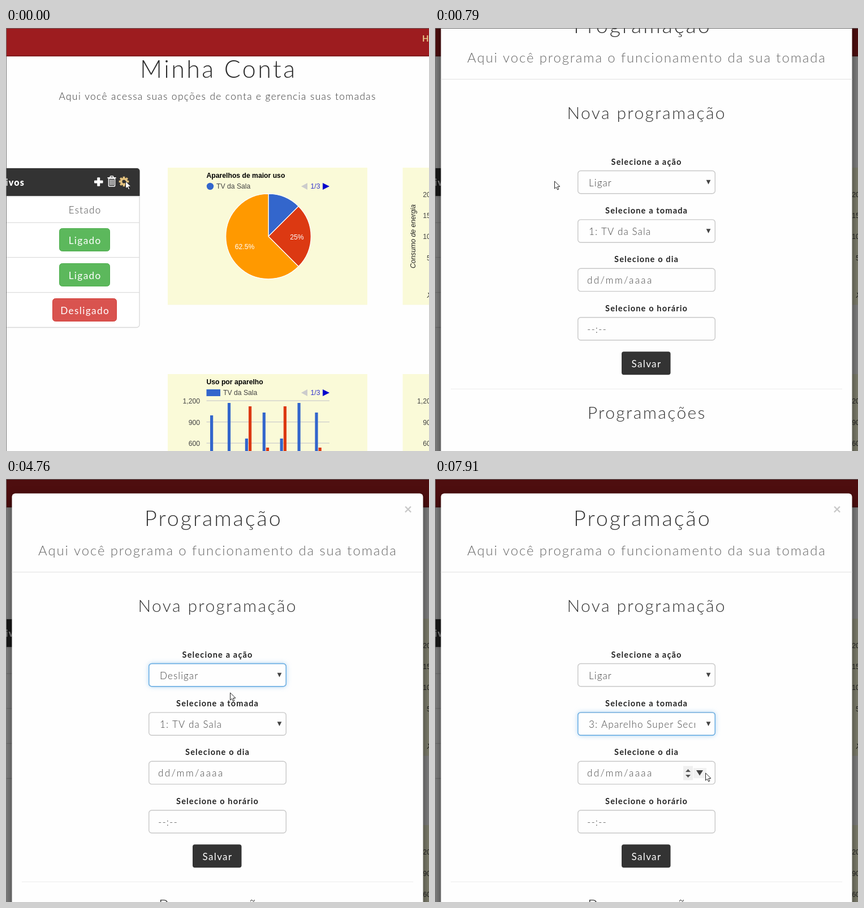
Animation, 748 px wide and 748 px high, one loop 8 s. Source, as an HTML page with a canvas:

```html
<!DOCTYPE html>
<html lang="pt-BR">
<head>
<meta charset="utf-8">
<title>Minha Conta</title>
<style>
  html, body { margin: 0; width: 100%; height: 100%; overflow: hidden; background: #fff; }
  canvas { display: block; }
</style>
</head>
<body>
<canvas id="stage" width="748" height="748"></canvas>
<script>
const ctx = document.getElementById('stage').getContext('2d');
const LOOP = 8000, SIZE = 748, ITEM = 23;
const BLUE = '#3366cc', RED = '#dc3912', ORANGE = '#ff9900', CREAM = '#fafad8';

// Cursor moves: start, end, number of visible steps, destination x, y
const moves = [
  [2160, 2290, 2, 216, 268],
  [2730, 3390, 6, 420, 342],
  [3830, 4430, 5, 402, 406],
  [4580, 4760, 2, 396, 378],
  [4880, 5160, 3, 408, 340],
  [5300, 5580, 3, 404, 372],
  [5880, 6420, 5, 403, 429],
  [6700, 6850, 2, 402, 484],
  [6970, 7250, 3, 410, 506],
  [7520, 7910, 4, 478, 520],
];
const actions = ['Ligar', 'Desligar'];
const outlets = ['1: TV da Sala', '2: Abajur', '3: Aparelho Super Secreto'];

// Value of the last [time, value] pair already reached
const at = (t, ...pairs) => pairs.filter(p => p[0] <= t).pop()[1];

function cursorAt(t) {
  let x = 211, y = 271;
  for (const [start, end, steps, toX, toY] of moves) {
    if (t < start) break;
    const shown = Math.min(steps - 1, Math.floor((t - start) / (end - start) * (steps - 1) + 1e-6)) + 1;
    const p = shown / steps, k = p * p * (3 - 2 * p);
    x += (toX - x) * k;
    y += (toY - y) * k;
  }
  return { x, y };
}

function rect(x, y, w, h, fill, stroke, r = 0) {
  ctx.beginPath();
  ctx.roundRect(x, y, w, h, r);
  if (fill) { ctx.fillStyle = fill; ctx.fill(); }
  if (stroke) { ctx.strokeStyle = stroke; ctx.stroke(); }
}

function poly(points, fill, stroke) {
  ctx.beginPath();
  points.forEach(([x, y]) => ctx.lineTo(x, y));
  ctx.closePath();
  if (fill) { ctx.fillStyle = fill; ctx.fill(); }
  if (stroke) { ctx.strokeStyle = stroke; ctx.stroke(); }
}

function text(str, x, y, size, color, { weight = 300, align = 'center', spacing = .08 } = {}) {
  const gap = size * spacing;
  ctx.font = `${weight} ${size}px Lato, sans-serif`;
  ctx.letterSpacing = gap + 'px';
  ctx.textAlign = align;
  ctx.fillStyle = color;
  ctx.fillText(str, x + (align === 'center' ? gap / 2 : align === 'right' ? gap : 0), y);
}

function label(str, x, y, color = '#444', align = 'left', style = '') {
  ctx.font = `${style} 12.2px "Liberation Sans", Arial, sans-serif`;
  ctx.letterSpacing = '0px';
  ctx.textAlign = align;
  ctx.fillStyle = color;
  ctx.fillText(str, x, y);
}

function gear(x, y, color) {
  ctx.save();
  ctx.translate(x, y);
  ctx.strokeStyle = color;
  ctx.lineWidth = 3.6;
  ctx.beginPath();
  ctx.arc(0, 0, 4.9, 0, 7);
  ctx.stroke();
  for (let i = 0; i < 8; i++) {
    ctx.rotate(Math.PI / 4);
    rect(-1.8, -8.8, 3.6, 3.4, color);
  }
  ctx.restore();
}

function trash(x, y) {
  rect(x, y + 2, 15, 2, '#fff');
  ctx.lineWidth = 1.6;
  rect(x + 4.8, y, 5.4, 3, null, '#fff', 1);
  rect(x + 2, y + 4, 11, 14, null, '#fff', 1);
  for (let i = 0; i < 3; i++) rect(x + 4.2 + i * 2.6, y + 6, 1.4, 10, '#fff');
  ctx.lineWidth = 1;
}

function deviceCard(gearColor) {
  ctx.lineWidth = 1.3;
  rect(-20, 248, 256, 281.5, '#fff', '#d8d8d8', 5);
  rect(-20, 248, 256.5, 49, '#333', null, [0, 5, 0, 0]);
  [298, 344, 405.5, 467.5].forEach(y => rect(0, y - .6, 236, 1.3, '#ddd'));
  text('ivos', 32, 279, 16, '#fff', { weight: 900, align: 'right' });
  rect(156, 269.5, 15.5, 5, '#fff', null, 1);
  rect(161.2, 264.3, 5, 15.5, '#fff', null, 1);
  trash(179.5, 262);
  gear(208.5, 271.5, gearColor);
  text('Estado', 139, 328, 17, '#444');
  const button = (str, x, y, w, fill, border) => {
    rect(x + .5, y + .5, w - 1, 40, fill, border, 5);
    text(str, x + w / 2, y + 28, 17.2, '#fff', { weight: 400 });
  };
  button('Ligado', 94, 354, 90, '#5cb85c', '#4cae4c');
  button('Ligado', 94, 416, 90, '#5cb85c', '#4cae4c');
  button('Desligado', 82, 478, 114, '#d9534f', '#d43f3a');
}

function chartHead(title, y) {
  label(title, 354.5, y + 17.5, '#000', 'left', 'bold');
  poly([[522, y + 33], [533, y + 27], [533, y + 39]], '#ccc');
  poly([[572, y + 33], [560, y + 27], [560, y + 39]], '#0000cc');
  label('1/3', 547, y + 37, '#3333cc', 'center');
}

function pieChart() {
  chartHead('Aparelhos de maior uso', 247);
  ctx.fillStyle = BLUE;
  ctx.beginPath();
  ctx.arc(361, 280, 6.2, 0, 7);
  ctx.fill();
  label('TV da Sala', 372, 284);
  let angle = -Math.PI / 2;
  [[.125, BLUE], [.25, RED], [.625, ORANGE]].forEach(([share, color]) => {
    const end = angle + share * 2 * Math.PI;
    ctx.beginPath();
    ctx.moveTo(464, 368.5);
    ctx.arc(464, 368.5, 75.3, angle, end);
    ctx.closePath();
    ctx.fillStyle = color;
    ctx.fill();
    ctx.strokeStyle = '#fff';
    ctx.lineWidth = 1.2;
    ctx.stroke();
    angle = end;
  });
  label('25%', 514.5, 373.5, '#fff', 'center');
  label('62.5%', 422, 390.5, '#fff', 'center');
}

function barChart() {
  chartHead('Uso por aparelho', 612);
  rect(354.5, 639, 24.5, 12, BLUE);
  label('TV da Sala', 384, 649);
  ['1,200', '900', '600'].forEach((value, i) => {
    const y = 659 + i * 37.5;
    rect(354.5, y - .5, 217.5, 1.3, '#ccc');
    label(value, 343, y + 5, '#444', 'right');
    label(value, 757.5, y + 5, '#444', 'right');
  });
  const blue = [685, 663, 726, 680, 726, 663, 680], red = [0, 0, 669, 742, 669, 0, 742];
  blue.forEach((top, i) => {
    const x = 361 + i * 30.9;
    rect(x, top, 5.2, SIZE - top, BLUE);
    if (red[i]) rect(x + 6.2, red[i], 5.2, SIZE - red[i], RED);
  });
}

function page(t) {
  rect(0, 0, SIZE, SIZE, '#fefefe');
  rect(0, 0, SIZE, 50, '#9d1c1f');
  rect(0, 48.6, SIZE, 1.6, '#7b1417');
  if (t < 300) text('H', 736, 24, 15, '#e8c98a', { weight: 700, align: 'left' });
  text('Minha Conta', 374, 88, 43, '#2b2b2b');
  text('Aqui você acessa suas opções de conta e gerencia suas tomadas', 373.5, 126.5, 17.3, '#333');
  deviceCard(t < 300 ? '#e3c27f' : '#fff');
  [[286, 247], [701.5, 247], [286, 612], [701.5, 612]].forEach(([x, y]) => rect(x, y, 353, 242.5, CREAM));
  pieChart();
  barChart();
  ['200', '150', '100', '50'].forEach((v, i) => label(v, 757.5, 298.5 + i * 37.4, '#444', 'right'));
  label('X', 744.5, 477, '#222', 'left', 'italic');
  ctx.save();
  ctx.translate(724, 368.5);
  ctx.rotate(-Math.PI / 2);
  label('Consumo de energia', 0, 0, '#222', 'center', 'italic');
  ctx.restore();
}

const fieldY = row => 326.5 + row * 86.4;

function field(row, title, value, { focus = 0, x = 272, select = false, spacing = .066 } = {}) {
  const y = fieldY(row);
  const box = (fill, stroke) => rect(252.7, y, 242.6, 40.3, fill, stroke, 5);
  text(title, 373.5, y - 11, 14.5, '#222', { weight: 700 });
  ctx.lineWidth = 1.4;
  ctx.save();
  ctx.shadowColor = `rgba(102,175,233,${.6 * focus})`;
  ctx.shadowBlur = 8;
  box('#fefefe');
  ctx.restore();
  box(null, '#c8c8c8');
  if (focus) box(null, `rgba(102,175,233,${focus})`);
  ctx.save();
  ctx.beginPath();
  ctx.rect(254, y, 206, 40);
  ctx.clip();
  text(value, x, y + 27, 17, '#444', { align: 'left', spacing });
  ctx.restore();
  if (select) poly([[479.6, y + 16.3], [487.4, y + 16.3], [483.5, y + 24]], '#444');
}

function list(row, items, selected, cursorY, filled) {
  const top = fieldY(row) + 40.8;
  const hover = cursorY < top ? selected : Math.min(items.length - 1, Math.floor((cursorY - top) / ITEM));
  ctx.lineWidth = 1;
  rect(252.5, top, 243, items.length * ITEM - .5, '#fff', filled ? '#7fa9d0' : '#e4e8ec');
  if (!filled) return;
  items.forEach((item, i) => {
    const y = top + i * ITEM;
    if (i === hover) rect(253, y + .5, 242, ITEM - 1, '#1e90ff');
    text(item, 272, y + 17, 17, i === hover ? '#fff' : '#444', { align: 'left', spacing: .066 });
  });
}

function dateControls() {
  rect(439, 507.5, 17, 25, '#efefef');
  rect(457, 511, 23, 18, '#f1f1f1');
  poly([[443, 518], [452, 518], [447.5, 513]], '#555');
  poly([[443, 523], [452, 523], [447.5, 528]], '#555');
  poly([[462, 515], [474, 515], [468, 524.5]], '#444');
}

function modal(t, cursor) {
  const [alpha, shift] = at(t, [0, [0, 0]], [610, [.15, -220]], [790, [1, -74]], [950, [1, 0]]);
  if (!alpha) return;
  ctx.save();
  ctx.globalAlpha = alpha;
  ctx.translate(0, shift);
  ctx.save();
  ctx.shadowColor = 'rgba(0,0,0,.5)';
  ctx.shadowBlur = 15;
  ctx.shadowOffsetY = 5;
  rect(10.5, 25.5, 727, 1100, '#fefefe', null, 6);
  ctx.restore();

  text('×', 711, 62, 25, '#c8c8c8', { weight: 700, spacing: 0 });
  text('Programação', 365.5, 83, 37.7, '#333');
  text('Aqui você programa o funcionamento da sua tomada', 373.5, 134.5, 23.9, '#666');
  rect(10.5, 164, 727, 1.3, '#e5e5e5');
  text('Nova programação', 373, 234.5, 30, '#333');

  const outletFocus = at(t, [0, 0], [6420, .3], [6550, .7], [6700, 1]);
  const actionFocus = t < 6420 ? at(t, [0, 0], [3390, .45], [3540, 1]) : 1 - outletFocus;
  const action = at(t, [0, 0], [4580, 1], [5880, 0]);
  const outlet = at(t, [0, 0], [7520, 2]);
  field(0, 'Selecione a ação', actions[action], { focus: actionFocus, select: true });
  field(1, 'Selecione a tomada', outlets[outlet], { focus: outletFocus, select: true });
  field(2, 'Selecione o dia', 'dd/mm/aaaa', { x: 269, spacing: .14 });
  field(3, 'Selecione o horário', '--:--', { x: 269 });

  rect(330, 646.3, 86.5, 41, '#333', null, 4);
  text('Salvar', 373.3, 673.5, 17, '#fff', { weight: 400 });
  rect(28, 711.8, 692, 1.2, '#eee');
  text('Programações', 373.5, 764.5, 30, '#333');

  if (at(t, [0, 0], [3390, 1], [4580, 0], [5300, 1], [5880, 0])) list(0, actions, action, cursor.y, t >= 3540);
  if (at(t, [0, 0], [6550, 1], [7520, 0])) list(1, outlets, outlet, cursor.y, t >= 6700);
  if (t >= 7780) dateControls();
  ctx.restore();
}

function pointer({ x, y }) {
  ctx.save();
  ctx.translate(x + .5, y);
  ctx.lineWidth = 1;
  poly([[0, 0], [0, 13], [3, 10.4], [5.2, 15], [7.3, 14], [5.2, 9.6], [9.4, 9.3]], '#fff', '#222');
  ctx.restore();
}

function draw(t) {
  const cursor = cursorAt(t);
  ctx.lineWidth = 1;
  page(t);
  rect(0, 0, SIZE, SIZE, `rgba(0,0,0,${at(t, [0, 0], [300, .02], [470, .11], [610, .5])})`);
  modal(t, cursor);
  rect(0, 0, SIZE, 1, '#666');
  rect(0, 0, 1, SIZE, '#777');
  pointer(cursor);
}

const begin = performance.now();
function tick() {
  draw((performance.now() - begin) % LOOP);
  requestAnimationFrame(tick);
}
tick();
</script>
</body>
</html>
```
